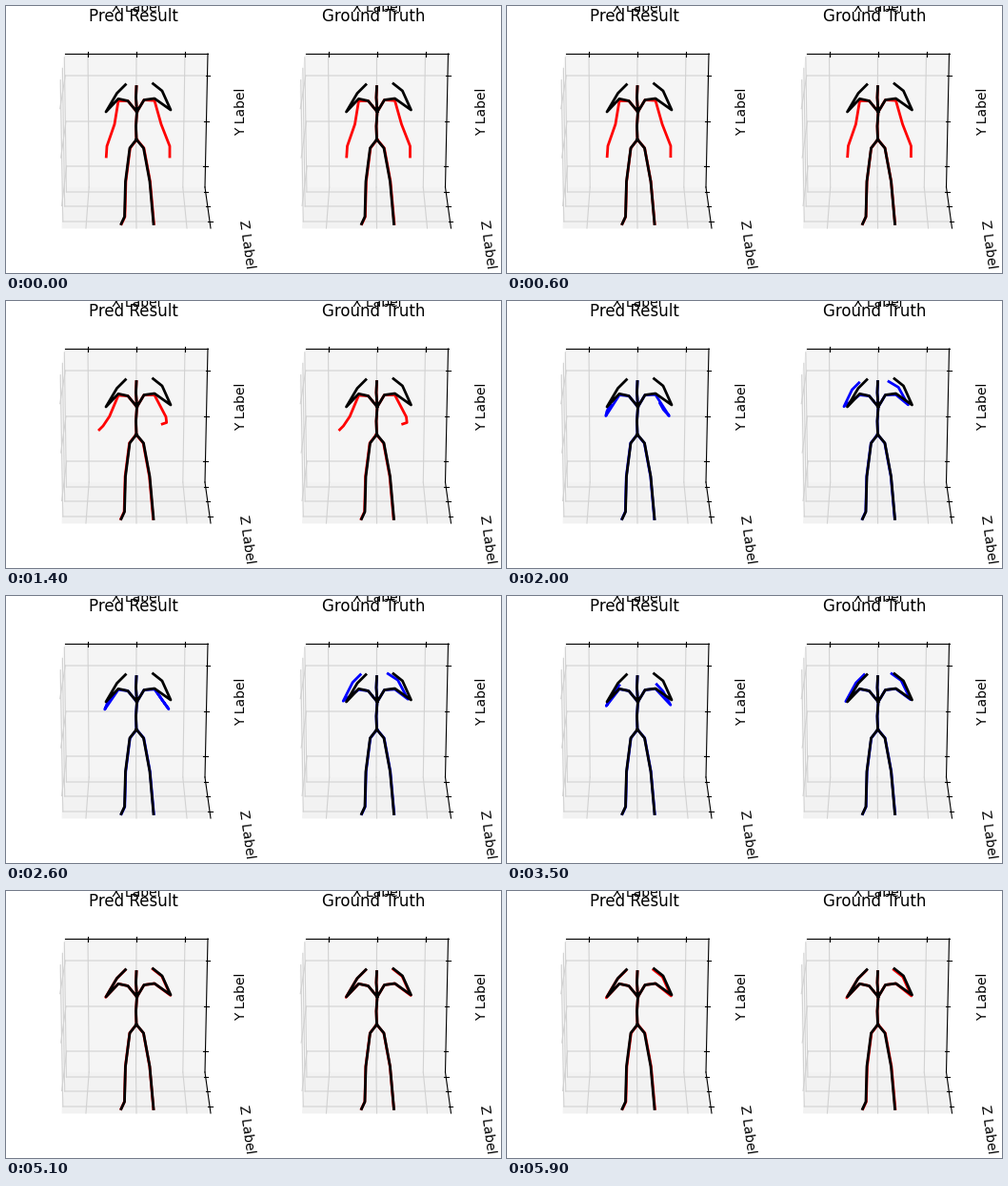
A matplotlib script that plays this animation: 520x280 px, repeating every 6 s.

```python
import numpy as np
import matplotlib.pyplot as plt
from matplotlib.animation import FuncAnimation

W, H, DPI = 520, 280, 100
FRAMES, INTERVAL = 60, 100
SHIFT = 252.5            # distance between the two panels
BLUE_SPAN = range(15, 45)
GRID = "#d2d2d2"

plt.rcParams["font.family"] = "DejaVu Sans"

# Fixed joints, in pixels of the left panel
SPINE = [(137, 84.5), (136.5, 96), (137.5, 111), (136.5, 126), (137, 140)]
LEFT_LEG = [(137, 140), (130, 149), (125.5, 184), (124.5, 221), (121, 228.5)]
RIGHT_LEG = [(137, 140), (144.5, 149), (151, 184), (155, 228.5)]
LEFT_SHOULDER = [(137.5, 111), (128, 99.5), (118, 97.3)]
RIGHT_SHOULDER = [(137.5, 111), (145, 98.5), (156, 97)]

# Arm poses: elbow, wrist, hand of the left arm, then of the right
REST = np.array([[(114, 124), (106, 147), (105.3, 158)],
                 [(163, 124), (172, 147), (172, 158)]])
LIFT = np.array([[(108.7, 121), (102, 131), (98, 135)],
                 [(168, 121.5), (168.7, 127.5), (164.2, 129)]])
FOLD = np.array([[(103.5, 120.5), (105, 115), (109, 107)],
                 [(170.5, 120.5), (164, 113), (160.5, 106)]])
GOAL = np.array([[(105, 111), (116.5, 91.5), (125.5, 82.5)],
                 [(173, 109), (164, 89), (154.5, 81.5)]])
LEAN = np.array([(-4, -1), (-6, -1), (-7, 0)])    # overshoot of elbow, wrist, hand
SETTLE = np.array([-0.7, 1])                      # late drift of both arms


def progress(i, start, end):
    return np.clip((i - start) / (end - start), 0, 1)


def mix(a, b, t):
    a, b = np.asarray(a), np.asarray(b)
    return a + (b - a) * t


def raise_to(pose, i, end):
    """Speed up from rest to the lifted pose, then slow down into the given one."""
    lifted = mix(REST, LIFT, progress(i, 5, 14) ** 2)
    return mix(lifted, pose, 1 - (1 - progress(i, 14, end)) ** 2)


def true_arms(i):
    lean = LEAN * (1 - progress(i, 22, 44))
    return raise_to(GOAL + lean, i, 22) + SETTLE * progress(i, 44, 59)


def predicted_arms(i):
    target = mix(FOLD, GOAL, progress(i, 22, 46))
    return raise_to(target, i, 22) + SETTLE * progress(i, 46, 59)


def skeleton(arms, drop=0.0, sway=0.0):
    """Limbs as separate strokes; drop lowers the shoulders, sway moves the legs."""
    limbs = [SPINE, np.add(LEFT_LEG, (sway, 0)), np.add(RIGHT_LEG, (sway, 0))]
    for shoulder, arm in zip((LEFT_SHOULDER, RIGHT_SHOULDER), arms):
        limbs.append(np.vstack([shoulder[:2], np.add(shoulder[2], (0, drop)), arm]))
    gap = [(np.nan, np.nan)]
    return np.vstack([np.vstack([limb, gap]) for limb in limbs])


fig = plt.figure(figsize=(W / DPI, H / DPI), dpi=DPI, facecolor="white")
ax = fig.add_axes([0, 0, 1, 1])
ax.set_xlim(0, W)
ax.set_ylim(H, 0)
ax.axis("off")


def draw_panel(dx, title):
    def line(a, b, color="black", z=2):
        ax.plot([a[0] + dx, b[0] + dx], [a[1], b[1]], color=color, lw=0.8,
                zorder=z, snap=False if color == GRID else None)

    def grid(a, b):
        line(a, b, GRID, 1)

    def side_tick(x, y):
        line((x - 2, y), (x + 2.5, y))

    def pane(corners, shade):
        ax.fill([x + dx for x, _ in corners], [y for _, y in corners],
                color=str(shade), lw=0.5, zorder=0)

    def label(x, y, text, size=10, angle=0):
        ax.text(x + dx, y, text, size=size, rotation=angle, ha="center",
                va="baseline", rotation_mode="anchor", zorder=6)

    # Corners of the far wall, and of the near edges of side wall and floor
    tl, tr, bl, br = (62, 50), (212, 50), (64, 190), (209, 190)
    near_tl, near_bl, near_br = (56.3, 83), (59, 233), (215, 233)
    pane([tl, bl, near_bl, near_tl], 0.975)
    pane([bl, br, near_br, near_bl], 0.95)
    pane([tl, tr, br, bl], 0.9625)

    for t in (0.16, 0.5, 0.84):
        top, far = mix(tl, tr, t), mix(bl, br, t)
        grid(top, far)
        grid(far, mix(near_bl, near_br, t))
        line((top[0], 48), (top[0], 52.5))
    for y in (73, 121, 168):
        t = progress(y, 50, 190)
        left, right = mix(tl, bl, t), mix(tr, br, t)
        grid(left, right)
        grid(left, mix(near_tl, near_bl, t))
        side_tick(*right)
    for y in (195, 210, 226):
        t = progress(y, 190, 233)
        left, right = mix(bl, near_bl, t), mix(br, near_br, t)
        grid(left, right)
        grid(left, mix(tl, near_tl, t))
        side_tick(*right)
    for a, b in ((tl, tr), (tr, br), (br, near_br)):
        line(a, b)

    label(134, 16, title, size=12)
    label(137, 5.5, "X Label")
    label(251.5, 111, "Y Label", angle=90)
    label(249, 250, "Z Label", angle=-82)

    moving, = ax.plot([], [], lw=2, zorder=4)
    goal = skeleton(GOAL)
    ax.plot(goal[:, 0] + dx, goal[:, 1], color="black", lw=2, zorder=5)
    return moving


PANELS = [
    (draw_panel(0, "Pred Result"), predicted_arms, 0),
    (draw_panel(SHIFT, "Ground Truth"), true_arms, SHIFT),
]


def update(i):
    color = "blue" if i in BLUE_SPAN else "red"
    drop = 2.2 * (1 - progress(i, 5, 40))
    sway = 0.4 * np.cos(4 * np.pi * i / FRAMES)
    for moving, arms, dx in PANELS:
        points = skeleton(arms(i), drop, sway)
        moving.set_data(points[:, 0] + dx, points[:, 1])
        moving.set_color(color)
    return [panel[0] for panel in PANELS]


anim = FuncAnimation(fig, update, frames=FRAMES, interval=INTERVAL,
                     repeat=True, repeat_delay=0, blit=False)
plt.show()
```
